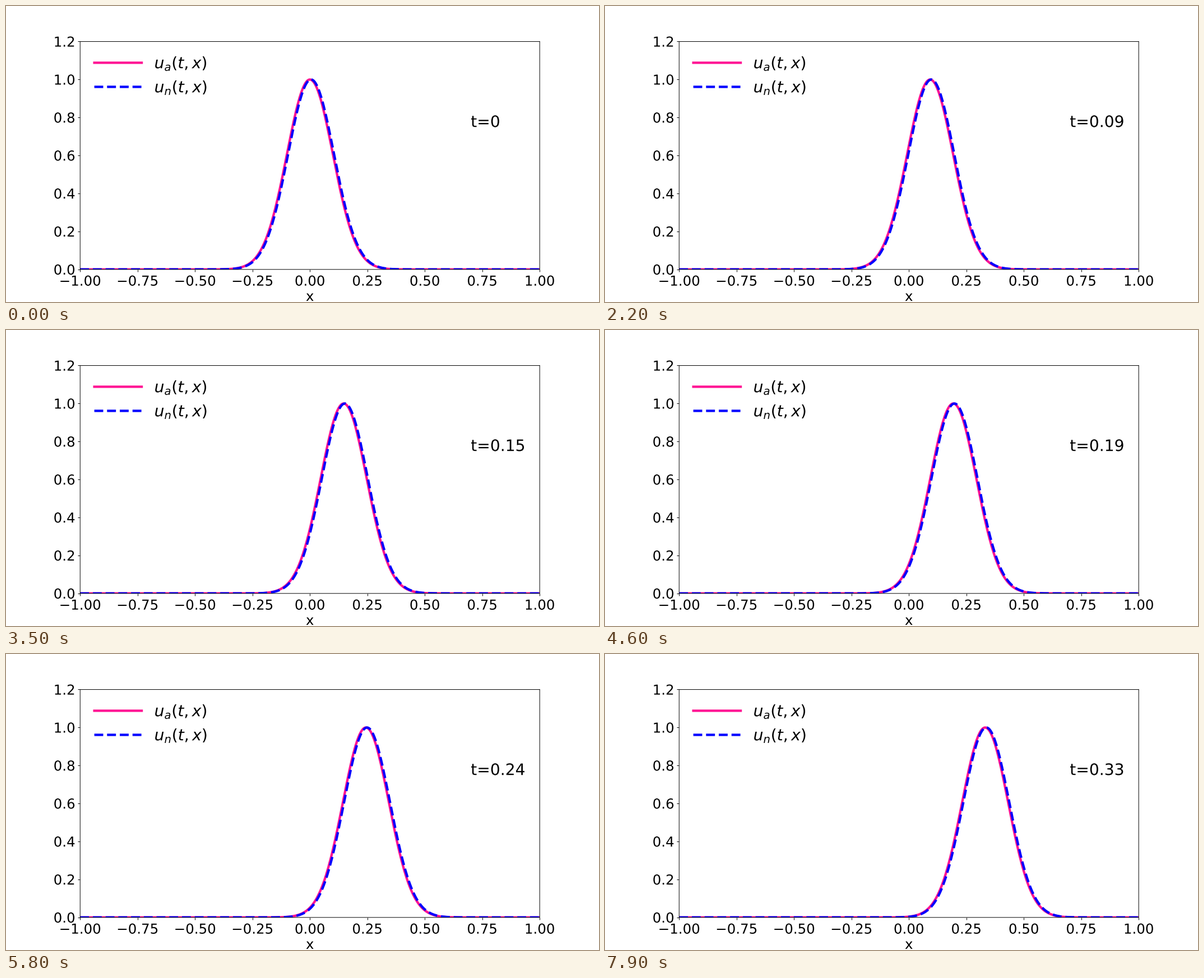
A matplotlib script that plays this animation: 1058x529 px, repeating every 8000 ms.

```python
import numpy as np
import matplotlib.pyplot as plt
from matplotlib.animation import FuncAnimation
from matplotlib.patheffects import Normal
from matplotlib.text import Text

plt.rcParams.update({
    "font.family": "DejaVu Sans",
    "mathtext.fontset": "dejavusans",
    "text.hinting": "none",
    "path.snap": False,
})

WIDTH_IN, HEIGHT_IN = 12, 6
DPI = 1058 / WIDTH_IN
FRAMES, INTERVAL = 80, 100
SIGMA = 0.1

x = np.linspace(-1, 1, 401)
dx = x[1] - x[0]
dt = 0.84 * dx


def pulse(center):
    return np.exp(-((x - center) ** 2) / (2 * SIGMA**2))


fig, ax = plt.subplots(figsize=(WIDTH_IN, HEIGHT_IN), dpi=DPI)
fig.subplots_adjust(left=0.125, right=0.9, bottom=0.11, top=0.88)

exact, = ax.plot(x, pulse(0), color="deeppink", lw=3.5, label="$u_a(t,x)$")
numeric, = ax.plot(x, pulse(dx), "b--", lw=3.5, label="$u_n(t,x)$")
clock = ax.text(0.7, 0.75, "t=0", fontsize=23)

ax.set_xlim(-1, 1)
ax.set_ylim(0, 1.2)
ax.set_xticks(np.linspace(-1, 1, 9))
ax.set_yticks(np.linspace(0, 1.2, 7))
ax.tick_params(labelsize=20)
ax.tick_params(axis="x", pad=20.1)
for label in ax.get_xticklabels():
    label.set_va("baseline")
ax.set_xlabel("x", fontsize=20, va="baseline")
ax.xaxis.set_label_coords(0.5, -0.138)
ax.legend(loc="upper left", bbox_to_anchor=(0, 1.002), fontsize=23,
          handlelength=3, labelspacing=0.46, frameon=False)

# draw glyphs as outlines, for sub-pixel placement
for text in fig.findobj(Text):
    text.set_path_effects([Normal()])


def update(i):
    t = i * dt
    exact.set_ydata(pulse(t))
    # the numerical wave runs one grid cell ahead
    numeric.set_ydata(pulse(t + dx))
    clock.set_text(f"t={round(float(t), 2)}" if i else "t=0")
    return exact, numeric, clock


def init():
    return update(0)


anim = FuncAnimation(fig, update, frames=FRAMES, init_func=init,
                     interval=INTERVAL, repeat=True, repeat_delay=0)

plt.show()
```
